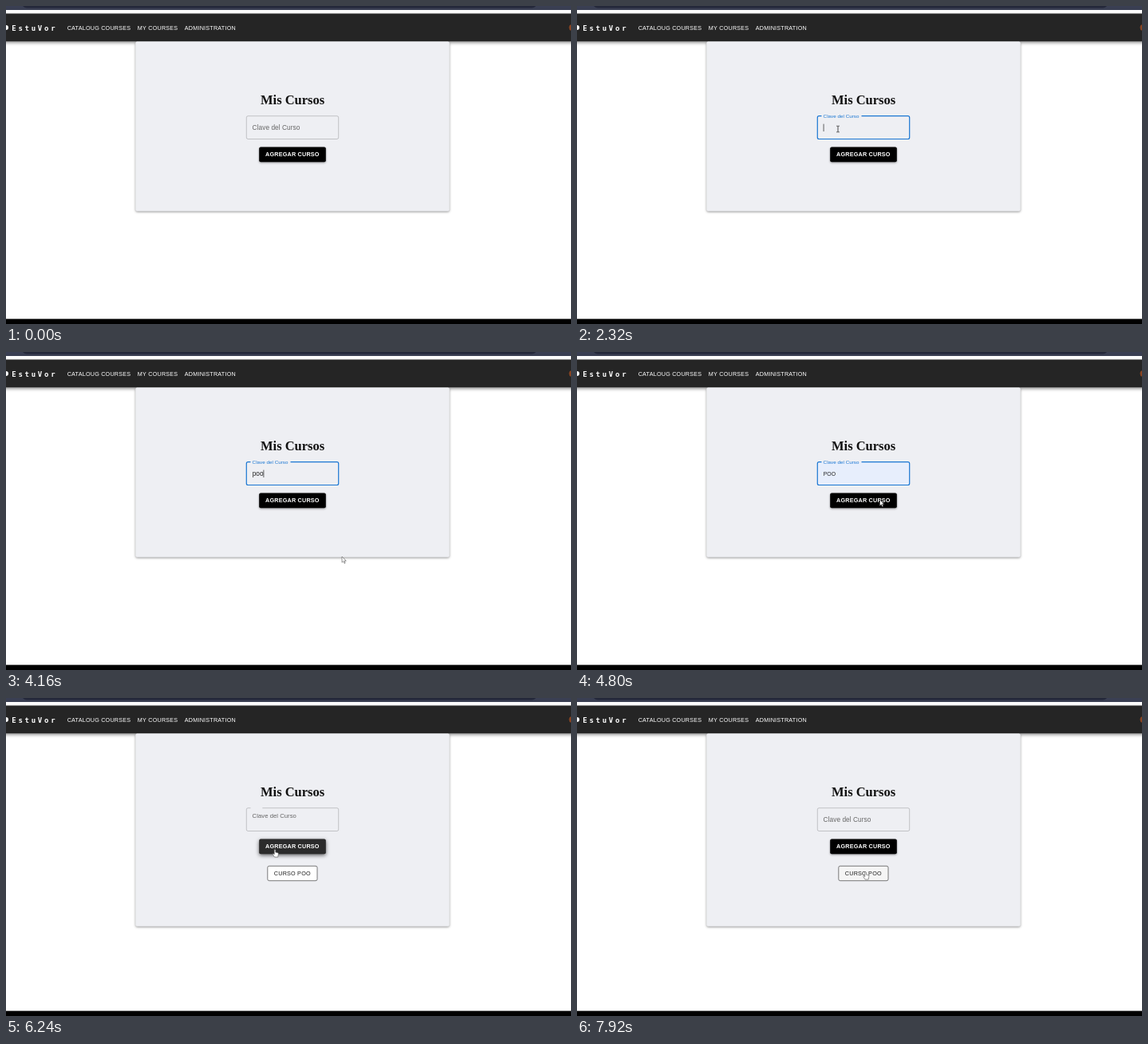
An HTML page with a canvas that plays this animation: 708 by 398 pixels, repeating every 8 s.

```html
<!DOCTYPE html>
<html lang="es">
<head>
<meta charset="utf-8">
<title>Mis Cursos</title>
<style>
html, body { margin: 0; width: 100%; height: 100%; overflow: hidden; background: #fff; }
canvas { display: block; width: 708px; height: 398px; }
</style>
</head>
<body>
<canvas id="stage" width="708" height="398"></canvas>
<script>
const ctx = document.getElementById('stage').getContext('2d');
const LOOP = 8000, STEP = 80;
const SANS = '"Liberation Sans", Arial, sans-serif';
const BLUE = [25, 118, 210], GREY = [102, 102, 102];
const FIELD = { x: 301.3, y: 137.7, w: 115.4, h: 28.8 };
const ADD = { x: 317.2, y: 176.5, w: 83.6, h: 18.7 };
const COURSE = { x: 327.8, y: 210.3, w: 62.2, h: 18.4 };

// Moments of the story, in ms
const FOCUS = 2160, PREVIEW = 4400, ACCEPT = 5120, HOVER = 5520;
const PRESS = 5840, ADDED = 6240, LEAVE = 6640, OPEN = 7360;

// Pointer path: time, x, y
const PATH = [
  [1120, 58, 241], [1200, 58, 241], [1680, 283, 159.5], [2080, 326, 152],
  [2320, 327, 154], [3920, 327, 154], [4160, 421, 256], [4240, 421, 256],
  [4720, 379.5, 185], [5040, 379.5, 185], [5440, 337, 189.5], [6400, 337, 189.5],
  [6640, 368, 226], [6800, 368, 226], [7040, 359.5, 219], [7360, 359.5, 219],
  [7520, 361.5, 217.5], [8000, 361.5, 217.5]
];

const clamp = v => Math.max(0, Math.min(1, v));
const ease = v => { v = clamp(v); return v * v * (3 - 2 * v); };
const easeOut = v => 1 - (1 - clamp(v)) ** 3;
const mix = (a, b, k) => a + (b - a) * k;
const inside = (p, b) => p.x >= b.x && p.x <= b.x + b.w && p.y >= b.y && p.y <= b.y + b.h;

function text(str, x, y, size, color, spacing = 0, weight = 400, family = SANS) {
  ctx.font = `${weight} ${size}px ${family}`;
  ctx.letterSpacing = spacing + 'px';
  ctx.fillStyle = color;
  ctx.fillText(str, x, y);
}

function boxPath(b, r = 2) {
  ctx.beginPath();
  ctx.roundRect(b.x, b.y, b.w, b.h, r);
}

function shadowBox(b, color, dy, blur, alpha, r = 2) {
  ctx.save();
  ctx.shadowColor = `rgba(0,0,0,${alpha})`;
  ctx.shadowOffsetY = dy;
  ctx.shadowBlur = blur;
  ctx.fillStyle = color;
  boxPath(b, r);
  ctx.fill();
  ctx.restore();
}

function ripple(b, x, y, radius, color) {
  ctx.save();
  boxPath(b);
  ctx.clip();
  ctx.fillStyle = color;
  ctx.beginPath();
  ctx.arc(x, y, radius, 0, 7);
  ctx.fill();
  ctx.restore();
}

function drawChrome() {
  ctx.fillStyle = '#fff';
  ctx.fillRect(0, 0, 708, 398);
  ctx.fillStyle = '#3a3f53';
  ctx.fillRect(0, 0, 708, 5);
  ctx.fillStyle = '#24283a';
  boxPath({ x: 20, y: -10, w: 645, h: 12.5 }, 6);
  ctx.fill();
  shadowBox({ x: -10, y: 9.5, w: 728, h: 34.8 }, '#252525', 1.5, 4, 0.45, 0);
  ctx.fillStyle = '#fff';
  ctx.beginPath();
  ctx.arc(0, 27, 3, 0, 7);
  ctx.fill();
  ctx.fillStyle = '#8a4522';
  ctx.beginPath();
  ctx.arc(709.5, 27, 4, 0, 7);
  ctx.fill();
  text('EstuVor', 7.3, 30.6, 9, '#fff', 2.72, 700, '"DejaVu Sans Mono", monospace');
  text('CATALOUG COURSES', 76.7, 29.7, 7.22, '#fff', 0.206);
  text('MY COURSES', 164.8, 29.7, 7.22, '#fff', 0.206);
  text('ADMINISTRATION', 223.8, 29.7, 7.22, '#fff', 0.206);
  ctx.fillStyle = '#000';
  ctx.fillRect(0, 391.6, 708, 7);
}

function drawField(t, pointer) {
  const focused = t >= FOCUS && t < PRESS;
  const preview = (t >= 4000 && t < 4160) || (t >= PREVIEW && t < ACCEPT);
  const filled = preview || (t >= ACCEPT && t < ADDED);
  const shrink = easeOut((t - FOCUS + STEP) / 240) * (1 - easeOut((t - ADDED + STEP) / 240));
  const hover = !focused && pointer && t < FOCUS && inside(pointer, FIELD);

  if (filled) {
    ctx.fillStyle = '#e7eefc';
    boxPath(FIELD);
    ctx.fill();
  }

  // Outline with a notch for the floating label
  ctx.save();
  if (shrink > 0) {
    ctx.beginPath();
    ctx.rect(295, 130, 130, 45);
    ctx.rect(306.5, 135, 50 * shrink, 6);
    ctx.clip('evenodd');
  }
  ctx.lineWidth = focused ? 1.2 : 0.7;
  ctx.strokeStyle = focused ? '#1976d2' : hover ? '#222' : 'rgba(0,0,0,.27)';
  boxPath(FIELD);
  ctx.stroke();
  ctx.restore();

  const blue = ease((t - FOCUS + STEP) / 200) * (1 - ease((t - PRESS) / 200));
  const color = BLUE.map((c, i) => Math.round(mix(GREY[i], c, blue)));
  const size = mix(8.26, 6.2, shrink);
  text('Clave del Curso', 308.6, mix(154.6, 139.6, shrink), size, `rgb(${color})`, size * 0.0094);

  if (preview) {
    text('POO', 308.7, 154.8, 6.88, '#222');
  } else if (filled) {
    text('POO', 308.7, 154.9, 8.26, '#222');
  } else if (focused) {
    const typed = t < 2960 ? '' : t < 3120 ? 'p' : t < 3200 ? 'po' : 'poo';
    text(typed, 308.7, 154.9, 8.26, '#222');
    const caret = (t >= 2240 && t < 2720) || (t >= 2960 && t < 3760) || t >= 4160;
    if (caret) {
      ctx.fillStyle = '#222';
      ctx.fillRect(308.7 + typed.length * 4.62, 147.6, 0.7, 9.4);
    }
  }
}

function drawAdd(t) {
  const lift = ease((t - HOVER) / 160) * (1 - ease((t - LEAVE) / 160));
  shadowBox(ADD, '#000', mix(1, 1.8, lift), mix(2.5, 5, lift), mix(0.4, 0.6, lift));
  const grow = easeOut((t - PRESS) / 550);
  const alpha = 0.3 * (1 - clamp((t - PRESS - 160) / 550));
  if (t >= PRESS && alpha > 0) ripple(ADD, 338, 190, 66 * grow, `rgba(255,255,255,${alpha})`);
  text('AGREGAR CURSO', 325, 188.3, 7.22, '#fff', 0.206, 700);
}

function drawCourse(t) {
  ctx.fillStyle = '#fff';
  boxPath(COURSE);
  ctx.fill();
  if (t >= OPEN) ripple(COURSE, 361, 219, 6 + 34 * easeOut((t - OPEN) / 550), 'rgba(0,0,0,.04)');
  ctx.lineWidth = 0.7;
  ctx.strokeStyle = '#444';
  boxPath(COURSE);
  ctx.stroke();
  text('CURSO POO', 335.8, 222, 7.22, '#222', 0.206);
}

function pointerAt(t) {
  if (t < PATH[0][0]) return null;
  const i = PATH.findIndex(p => p[0] > t);
  const [t0, x0, y0] = PATH[i - 1], [t1, x1, y1] = PATH[i];
  const k = (t - t0) / (t1 - t0);
  return { x: mix(x0, x1, k), y: mix(y0, y1, k) };
}

const ARROW = new Path2D('M0 0V7.4L1.8 5.8L3 8.6L4.2 8L3 5.4H5.2Z');
const BEAM = new Path2D('M-1.8 -3.8H-.4L0 -3.4L.4 -3.8H1.8M0 -3.4V3.4M-1.8 3.8H-.4L0 3.4L.4 3.8H1.8');
const HAND = new Path2D('M-.8 .6Q0 -.5 .8 .6V3.6L3.6 4.2Q4.5 4.5 4.4 5.6L3.7 9.6H-.4L-2.7 6.3Q-2.8 5 -1.6 5.4L-.8 6.2Z');

function drawPointer(t, p) {
  ctx.save();
  ctx.translate(p.x, p.y);
  ctx.lineWidth = 0.6;
  if (t < 4000 && inside(p, FIELD)) {
    ctx.strokeStyle = '#222';
    ctx.lineWidth = 0.8;
    ctx.stroke(BEAM);
  } else {
    const link = inside(p, ADD) || (t >= ADDED && inside(p, COURSE));
    const shape = t >= ACCEPT && link ? HAND : ARROW;
    ctx.fillStyle = '#fff';
    ctx.strokeStyle = '#555';
    ctx.fill(shape);
    ctx.stroke(shape);
  }
  ctx.restore();
}

function draw(t) {
  const pointer = pointerAt(t);
  const added = t >= ADDED;
  drawChrome();
  shadowBox({ x: 162.3, y: 44.4, w: 393.4, h: added ? 241.4 : 212.4 }, '#eeeff3', 1, 3, 0.42);
  text('Mis Cursos', 319, 122.8, 16.5, '#111', 0, 700, '"Liberation Serif", "Times New Roman", serif');
  drawField(t, pointer);
  drawAdd(t);
  if (added) drawCourse(t);
  if (pointer) drawPointer(t, pointer);
}

const start = performance.now();
function tick() {
  const t = (performance.now() - start) % LOOP;
  draw(Math.floor(t / STEP) * STEP);
  requestAnimationFrame(tick);
}
tick();
</script>
</body>
</html>
```
